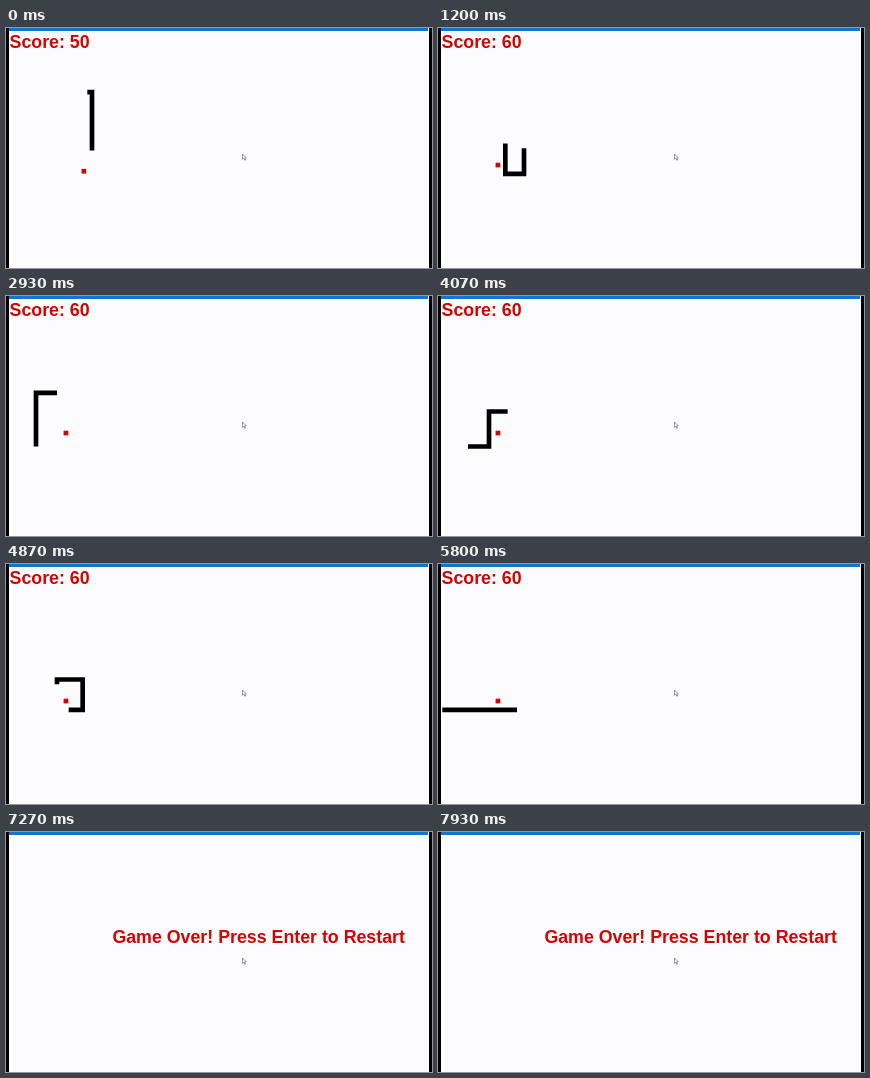
An HTML page for the animation above (8 s loop, 426x240 px).

```html
<!DOCTYPE html>
<html lang="en">
<head>
<meta charset="utf-8">
<title>Snake</title>
<style>
  html, body { margin: 0; width: 100%; height: 100%; overflow: hidden; background: #fcfcfe; }
  svg { display: block; width: 100%; height: 100%; }
  text { font: bold 17.8px "Liberation Sans", Arial, sans-serif; fill: #d20404; }
  #snake { fill: none; stroke: #000; stroke-width: 4.67; stroke-linecap: square; }
</style>
</head>
<body>
<svg viewBox="0 0 426 240">
  <rect width="426" height="240" fill="#000"/>
  <rect x="3" width="420" height="240" fill="#fcfcfe"/>
  <rect x="3" width="419" height="3" fill="#1076d2"/>
  <g id="game">
    <text id="score" x="3.6" y="20"></text>
    <rect id="food" width="4.7" height="4.7" fill="#d20404"/>
    <polyline id="snake"/>
  </g>
  <text id="over" x="106.4" y="110.5">Game Over! Press Enter to Restart</text>
  <path d="M236.5 126v5.2l1.2-1 .9 2 .9-.4-.8-1.9h1.6z" fill="#fff" stroke="#555" stroke-width=".6"/>
</svg>
<script>
  const LOOP = 8000, FPS = 15;
  const STEP = 7 / 3, ORIGIN = [86, 64.2];
  const START = 25, GROWTH = 5, EAT_AT = 13, CRASH_AT = 159;

  // Corners of the route in half-block steps.
  const corners = [[-1, 0], [0, 0], [0, 35], [-8, 35], [-8, 14], [-24, 14],
    [-24, 37], [-15, 37], [-15, 22], [-4, 22], [-4, 35], [-36, 35]];
  // Time in ms, steps travelled.
  const pace = [[0, 0], [1200, 31], [2930, 78], [4070, 110], [4870, 132], [5860, CRASH_AT]];

  const $ = id => document.getElementById(id);
  const [game, score, food, snake, over] = ['game', 'score', 'food', 'snake', 'over'].map($);

  function walk(points) {
    const cells = [points[0]];
    for (const [tx, ty] of points.slice(1)) {
      let [x, y] = cells[cells.length - 1];
      while (x !== tx || y !== ty) {
        x += Math.sign(tx - x);
        y += Math.sign(ty - y);
        cells.push([x, y]);
      }
    }
    return cells;
  }

  const route = walk(corners).map(cell =>
    cell.map((v, axis) => (ORIGIN[axis] + v * STEP).toFixed(2)));

  function travelled(ms) {
    const i = pace.findIndex(([end]) => ms < end);
    if (i < 0) return CRASH_AT;
    const [t0, d0] = pace[i - 1], [t1, d1] = pace[i];
    return Math.floor(d0 + (d1 - d0) * (ms - t0) / (t1 - t0) + 0.05);
  }

  function show(el, visible) {
    el.setAttribute('visibility', visible ? 'visible' : 'hidden');
  }

  function render(ms) {
    const frame = Math.floor(ms * FPS / 1000 + 0.05);
    const steps = travelled(Math.round(frame * 100 / FPS) * 10);
    const crashed = steps >= CRASH_AT, eaten = steps >= EAT_AT;
    show(game, !crashed);
    show(over, crashed);

    const length = START + Math.max(0, Math.min(GROWTH, steps - EAT_AT));
    const head = START + steps;
    snake.setAttribute('points', route.slice(head - length, head + 1).join(' '));
    score.textContent = `Score: ${eaten ? 60 : 50}`;
    food.setAttribute('x', eaten ? 57.6 : 75.5);
    food.setAttribute('y', eaten ? 134.7 : 140.9);
  }

  const began = performance.now();
  function tick() {
    render((performance.now() - began) % LOOP);
    requestAnimationFrame(tick);
  }
  tick();
</script>
</body>
</html>
```
